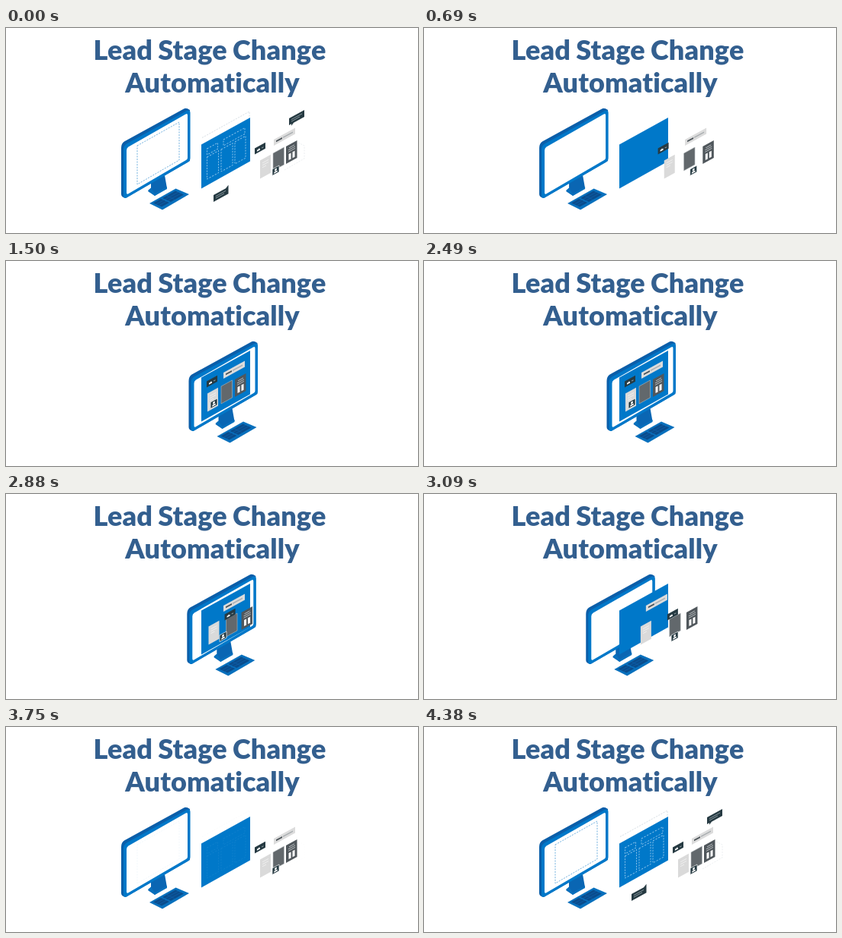
An HTML page that plays this animation: 540 px wide and 270 px high, repeating every 5.1 s.

```html
<!DOCTYPE html>
<html lang="en">
<head>
<meta charset="utf-8">
<title>Lead Stage Change</title>
<style>
  html, body { margin: 0; height: 100%; overflow: hidden; background: #fff; }
  svg { display: block; width: 100vw; height: 100vh; }
  text {
    font: 900 36px Lato, sans-serif; font-variant-ligatures: none;
    letter-spacing: .12px; word-spacing: -1.2px;
    fill: #335f8f; text-anchor: middle;
  }
  .dash { fill: none; stroke-width: .8; stroke-dasharray: 2 1.6; }
  .ink { fill: #263a42; }
</style>
</head>
<body>
<svg viewBox="0 0 540 270">
  <text x="267" y="41.5">Lead Stage Change</text>
  <text x="270.5" y="84.5">Automatically</text>

  <g id="monitor">
    <path fill="#0a66b3" d="M190 204L208 194L211 211L195 221L186 215L190 211Z"/>
    <path fill="#0870bd" d="M186 214L190 210.500L195 218L211 209V212L195 221Z"/>
    <path fill="#0b5ea9" d="M151 158Q151 152 155 149.500L233 106.500Q236 104.500 241 108V175L157 224Q151 223 151 219Z"/>
    <path fill="#0078c9" d="M154 160Q154 155 158 152.500L237 109Q241.500 107 241.500 112V171Q241.500 175 238 177L158 223.500Q154 225.500 154 220.500Z"/>
    <path fill="#fff" d="M158 161Q158 158 160.500 156.500L235.500 113.500Q238 112 238 115V171Q238 173 236 174L160 218.500Q158 219.500 158 217Z"/>
    <path fill="#0870bd" d="M188 231L222.500 211.500L240 219L205 239.500Z"/>
    <path fill="#0a4c8c" d="M193 230.500L203 225L214 230L204 235.500ZM205 224L222 214.500L233 219.500L216 229Z"/>
    <path stroke="#0d62ae" stroke-width=".7" d="M197 232L226 216M200 234L230 217.500M211 221L221 226"/>
    <path class="dash fade" stroke="#4d9cd6" d="M172 155L227 124V174L172 206Z"/>
  </g>

  <path fill="#0078c9" d="M256 153.500L320 118V175.500L256 211.500Z"/>
  <g class="fade">
    <g id="slots" class="dash" stroke="#a9d3f2"></g>
    <path class="dash" stroke="#ccd5dc" d="M257 144.500L319 110V118"/>
    <path class="dash" stroke="#e6eaed" d="M383 151L391 155V172L365 187"/>
  </g>

  <g id="light">
    <rect width="14" height="24" fill="#dadada"/>
    <path stroke="#efefef" d="M3 5H11M3 8H11M3 11H8"/>
  </g>
  <g id="grey">
    <rect width="14.500" height="23" fill="#62686c" stroke="#b9bec1" stroke-width=".5"/>
  </g>
  <g id="dark">
    <rect width="14.500" height="23" fill="#50575c"/>
    <path stroke="#d8dcde" stroke-width=".8" d="M4 4H11M3 6.500H12M3 9H12"/>
    <path fill="#fff" d="M3.500 12H6.500V20H3.500ZM8.500 12H11.500V20H8.500Z"/>
  </g>
  <g id="bar">
    <rect width="28" height="8" fill="#dcdcdc"/>
    <path stroke="#4b5358" stroke-width="2" d="M3 4H11"/>
    <path stroke="#a6abae" stroke-width="1.500" d="M12 4H25"/>
  </g>
  <g id="badge">
    <rect class="ink" width="14" height="8"/>
    <path fill="#fff" d="M3 4H4.500L5.500 2.500V4H7V6H3Z"/>
    <path stroke="#9aa7ad" d="M9 4.500H11.500"/>
  </g>
  <g id="person">
    <rect class="ink" width="9" height="8.500" stroke="#fff" stroke-width=".6"/>
    <circle cx="4.500" cy="3" r="1.500" fill="#fff"/>
    <path fill="#fff" d="M2 7Q2 4.800 4.500 4.800T7 7Z"/>
  </g>
  <g id="above">
    <path class="ink" d="M0 0H20V9H6L3 11.500V9H0Z"/>
    <path stroke="#a9b5ba" stroke-width=".8" d="M3 3.200H17M3 5.700H14"/>
  </g>
  <g id="below">
    <path class="ink" d="M0 0H16L19.500 -2.500V9H0Z"/>
    <path stroke="#a9b5ba" stroke-width=".8" d="M3 3.200H16M3 5.700H14"/>
  </g>
</svg>
<script>
  const LOOP = 5100, STEP = 30, MOVE = 870;
  const $ = id => document.getElementById(id);
  const progress = (t, start, length) => Math.min(1, Math.max(0, (t - start) / length));
  const ease = u => u < .5 ? 4 * u ** 3 : 1 - 4 * (1 - u) ** 3;
  const iso = (x, y) => `translate(${x} ${y}) skewY(-29)`;

  // Spread-out position, travel to the screen, start of the way in and out
  const cards = [
    { id: 'badge',  x: 326, y: 158.5, travel: 63, in: 320, out: 2485 },
    { id: 'light',  x: 333, y: 174.5, travel: 69, in: 338, out: 2728 },
    { id: 'grey',   x: 350, y: 165,   travel: 68, in: 406, out: 2629 },
    { id: 'bar',    x: 351, y: 147,   travel: 66, in: 409, out: 2845 },
    { id: 'dark',   x: 367, y: 156,   travel: 67, in: 530, out: 2604 },
    { id: 'person', x: 349, y: 186,   travel: 81, in: 607, out: 2590 }
  ];
  const bubbles = [
    { id: 'above', x: 371, y: 119, rise: -10, in: 3830 },
    { id: 'below', x: 272, y: 220, rise: 10,  in: 3950 }
  ];

  // Empty places on the panel: x, y, width, height
  $('slots').innerHTML = [
    [263.5, 159, 14, 8], [285, 147, 28, 8], [263.5, 170, 15, 29],
    [282, 160, 15, 29], [300, 150, 14, 29]
  ].map(([x, y, w, h]) =>
    `<rect width="${w}" height="${h}" transform="${iso(x, y)}"/>`).join('');

  const shift = (t, start, end) =>
    ease(progress(t, start, MOVE)) - ease(progress(t, end, MOVE));

  function draw(t) {
    $('monitor').setAttribute('transform', `translate(${88.5 * shift(t, 635, 2720)})`);

    for (const c of cards)
      $(c.id).setAttribute('transform', iso(c.x - c.travel * shift(t, c.in, c.out), c.y));

    const gone = 1 - progress(t, 300, 300);
    for (const b of bubbles) {
      const u = progress(t, b.in, 430);
      const offset = gone ? 0 : b.rise * (1 - ease(u));
      $(b.id).setAttribute('transform', iso(b.x, b.y + offset));
      $(b.id).setAttribute('opacity', gone + u);
    }

    for (const el of document.querySelectorAll('.fade'))
      el.setAttribute('opacity', gone + progress(t, 3720, 300));
  }

  const begin = performance.now();
  function frame() {
    const t = (performance.now() - begin) % LOOP;
    draw(Math.floor(t / STEP) * STEP);
    requestAnimationFrame(frame);
  }
  frame();
</script>
</body>
</html>
```
